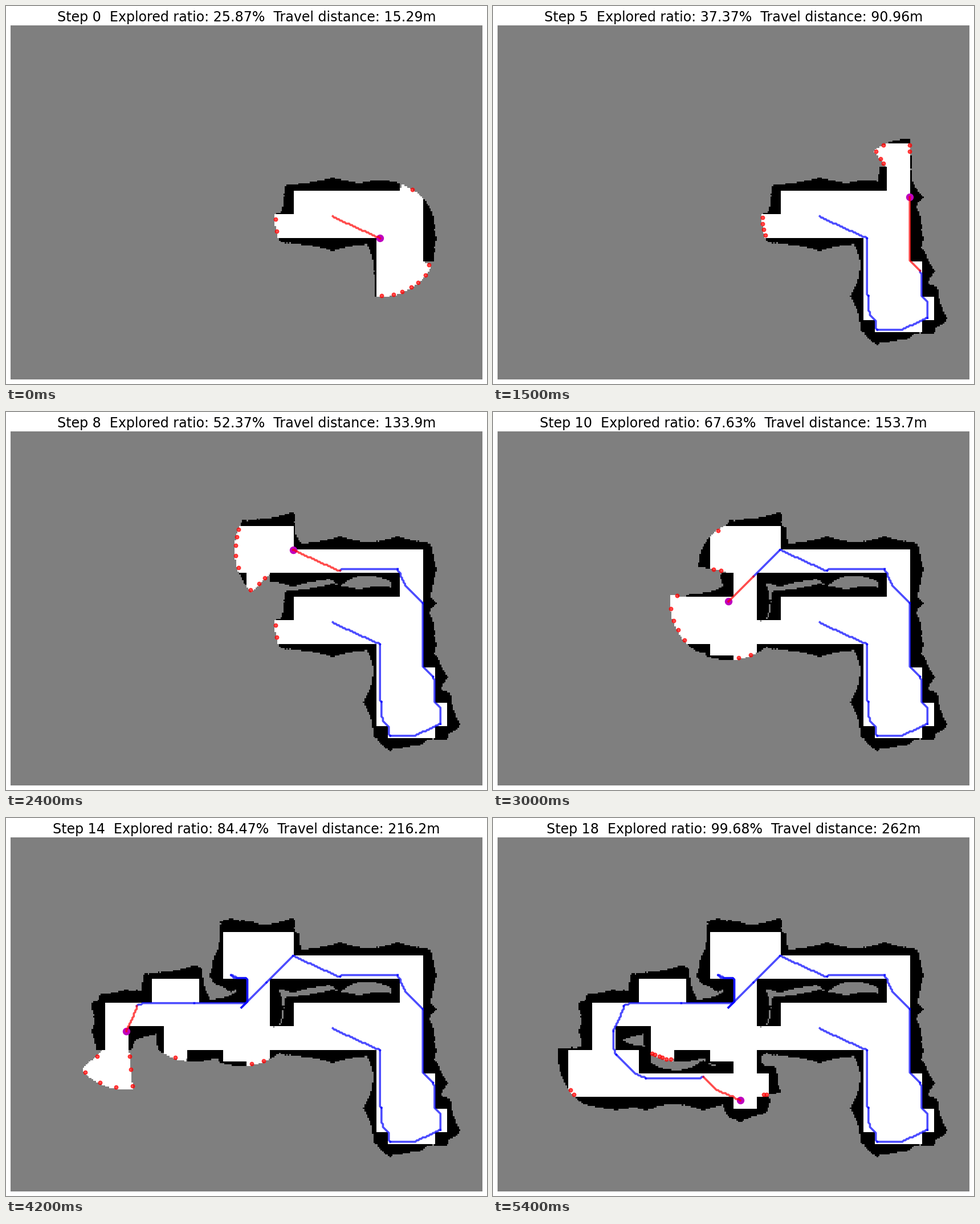
Write a matplotlib script that moves like this. It is 844 by 663 pixels and loops after 5700 ms.

```python
import math
import numpy as np
import matplotlib.pyplot as plt
from matplotlib.animation import FuncAnimation

W, H, DPI = 844, 663, 100
LEFT, TOP, MAP_W, MAP_H = 8.3, 33.6, 827.7, 621
COLS, ROWS = 320, 240
BLOCK = 8               # cells per block of the floor plan
CELL_M = 0.4            # metres per cell
SENSOR = 40             # sensor range in cells
DEPTH = 10              # wall cells after which a ray stops
N_DOTS = 10
WALL, UNKNOWN, FREE = 0, 127, 255
MOVES = [(i, j) for i in (-1, 0, 1) for j in (-1, 0, 1) if i or j]

# Corridors, two blocks wide, by the key points of their upper left corner
CORRIDORS = [
    [(22, 8), (18, 8), (18, 10), (33, 10), (33, 22)],
    [(20, 10), (20, 21)],
    [(12, 12), (14, 12)],
    [(20, 14), (8, 14), (8, 18)],
    [(33, 14), (24, 14)],
    [(13, 17), (13, 16), (33, 16)],
    [(18, 16), (18, 17)],
    [(10, 18), (6, 18), (6, 20), (21, 20)],
    [(31, 16), (31, 23), (35, 23)],
    [(34, 20), (34, 24), (32, 24)],
]

# Cells where the robot stops and scans
STOPS = [
    (218, 129), (250, 144), (251, 183), (257, 206), (291, 198), (286, 166),
    (279, 116), (262, 93), (223, 94), (191, 80), (173, 98), (156, 115),
    (149, 93), (124, 112), (85, 114), (78, 131), (80, 147), (100, 163),
    (139, 162), (164, 178),
]


def build_plan():
    plan = np.full((ROWS, COLS), WALL)
    for points in CORRIDORS:
        for ends in zip(points, points[1:]):
            x0, y0 = np.min(ends, axis=0) * BLOCK
            x1, y1 = (np.max(ends, axis=0) + 2) * BLOCK
            plan[y0:y1, x0:x1] = FREE
    return plan


def neighbours(grid, fill):
    """The grid shifted by each of the eight moves."""
    padded = np.pad(grid, 1, constant_values=fill)
    return [padded[1 + j:1 + j + ROWS, 1 + i:1 + i + COLS] for i, j in MOVES]


def cost_to(goal, free, rounds=80):
    """Walking distance in cells from everywhere near to the goal."""
    cost = np.full((ROWS, COLS), np.inf)
    cost[goal[1], goal[0]] = 0
    for _ in range(rounds):
        for move, other in zip(MOVES, neighbours(cost, np.inf)):
            cost = np.minimum(cost, other + math.hypot(*move))
        cost[~free] = np.inf
    return cost


def find_way(start, goal, free):
    """Shortest way; among equals take the move that leads straightest on."""
    cost = cost_to(goal, free)
    way = [start]
    while way[-1] != goal:
        x, y = way[-1]
        options = []
        for i, j in MOVES:
            step, nxt = math.hypot(i, j), (x + i, y + j)
            if abs(step + cost[nxt[1], nxt[0]] - cost[y, x]) < 1e-6:
                options.append((step + math.dist(nxt, goal), nxt))
        way.append(min(options)[1])
    return np.array(way), CELL_M * cost[start[1], start[0]]


def cast_ray(plan, belief, x, y, x1, y1):
    dx, dy = abs(x1 - x), abs(y1 - y)
    sx = 1 if x1 > x else -1
    sy = 1 if y1 > y else -1
    error, hits = dx - dy, 0
    for _ in range(dx + dy):
        value = plan[y][x]
        if value == WALL:
            hits += 1
            if hits >= DEPTH:
                return
        elif hits:
            return
        belief[y, x] = value
        if error > 0:
            x += sx
            error -= 2 * dy
        else:
            y += sy
            error += 2 * dx


def scan(plan, belief, pos):
    x, y = pos
    for half_deg in range(720):
        t = math.radians(half_deg / 2)
        cast_ray(plan, belief, x, y,
                 round(x + SENSOR * math.cos(t)), round(y + SENSOR * math.sin(t)))


def frontier(belief):
    """Free cells with at least two unknown neighbours, ordered by column."""
    around = sum(neighbours((belief == UNKNOWN).astype(int), 0))
    edge = (belief == FREE) & (around > 1) & (around < 8)
    return np.argwhere(edge.T).astype(float)


def distances(a, b):
    return np.hypot(*(a[:, None] - b[None]).transpose(2, 0, 1))


def spread(cells, k=N_DOTS):
    """Pick k cells spread evenly over the frontier (k-means, snapped)."""
    if len(cells) <= k:
        return cells
    centres = cells[((np.arange(k) + 0.5) * len(cells) / k).astype(int)]
    for _ in range(15):
        nearest = distances(cells, centres).argmin(axis=1)
        centres = np.array([cells[nearest == c].mean(axis=0) if (nearest == c).any()
                            else centres[c] for c in range(k)])
    return cells[distances(centres, cells).argmin(axis=1)]


# Run the whole exploration once
plan = build_plan()
free = plan == FREE
rows = plan.tolist()
belief = np.full((ROWS, COLS), UNKNOWN, dtype=np.uint8)
scan(rows, belief, STOPS[0])
maps, dots, ways, explored, travelled = [], [], [], [], []
total = 0.0
for start, goal in zip(STOPS, STOPS[1:]):
    way, metres = find_way(start, goal, free)
    total += metres
    scan(rows, belief, goal)
    ways.append(way)
    travelled.append(total)
    maps.append(belief.copy())
    dots.append(spread(frontier(belief)))
    explored.append(100 * (belief == FREE).sum() / free.sum())

# Stage
fig = plt.figure(figsize=(W / DPI, H / DPI), dpi=DPI, facecolor="white")
ax = fig.add_axes([LEFT / W, 1 - (TOP + MAP_H) / H, MAP_W / W, MAP_H / H])
image = ax.imshow(maps[0], cmap="gray", vmin=0, vmax=255, aspect="auto",
                  interpolation="nearest", zorder=0)
ax.set_xlim(-0.5, COLS - 0.5)
ax.set_ylim(ROWS - 0.5, -0.5)
ax.axis("off")
marks = ax.scatter([], [], s=20, c="red", alpha=0.7, linewidths=1.2, zorder=1)
robot, = ax.plot([], [], "o", color="m", markersize=8.6, zorder=2)
lines = [ax.plot(*way.T, color="blue", linewidth=2.6, alpha=0.7, zorder=3)[0]
         for way in ways]
title = fig.text((LEFT + MAP_W / 2) / W, (H - 27) / H, "", ha="center",
                 va="baseline", fontsize=17.08, family="DejaVu Sans", color="black")


def draw(step):
    image.set_data(maps[step])
    marks.set_offsets(dots[step])
    robot.set_data(*ways[step][-1:].T)
    for i, line in enumerate(lines):
        line.set_visible(i <= step)
        line.set_color("red" if i == step else "blue")
    title.set_text(f"Step {step}  Explored ratio: {explored[step]:.4g}%  "
                   f"Travel distance: {travelled[step]:.4g}m")
    return [image, marks, robot, title, *lines]


anim = FuncAnimation(fig, draw, frames=len(ways), interval=300,
                     repeat=True, repeat_delay=0, blit=False)
plt.show()
```
